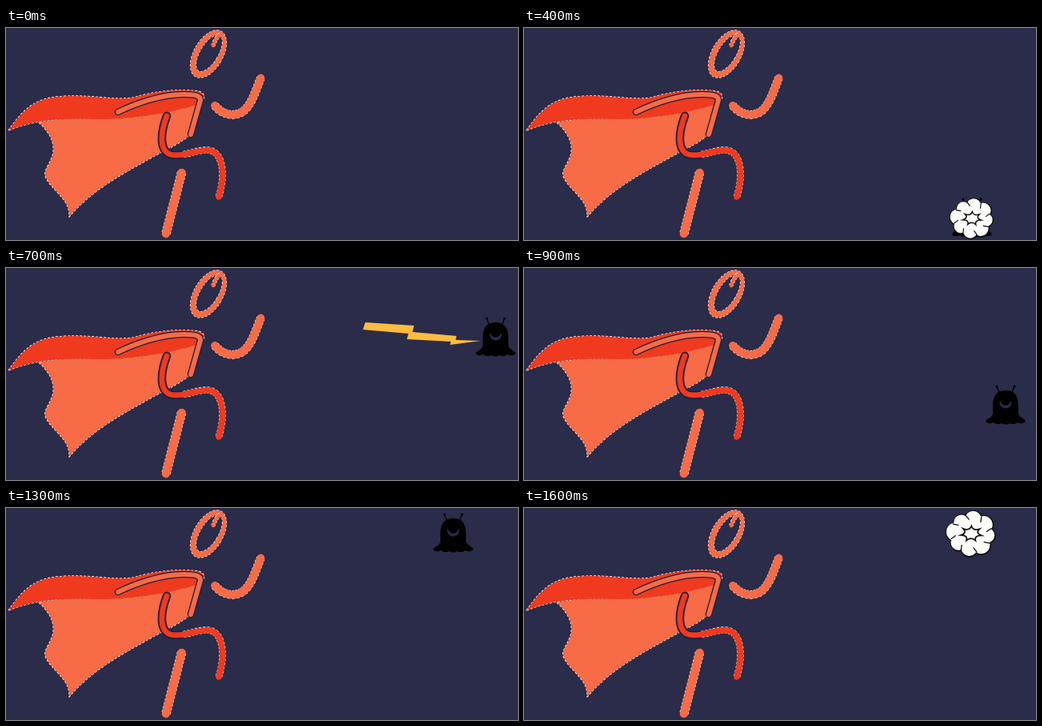
Write an HTML page with a canvas that moves like this. It is 640 px wide and 265 px high and loops after 1700 ms.

```html
<!DOCTYPE html>
<html lang="en">
<head>
<meta charset="utf-8">
<title>Caped hero</title>
<style>
html, body { margin: 0; width: 100%; height: 100%; overflow: hidden; background: #2b2c49; }
canvas { display: block; }
</style>
</head>
<body>
<canvas id="stage" width="640" height="265"></canvas>
<script>
const ctx = document.getElementById('stage').getContext('2d');
const NAVY = '#2b2c49', INK = '#1d1f42', ORANGE = '#f76b46', RED = '#ef3a1f';
const BOLT = '#ffbc40', CLOUD = '#fdfdf9', OUTLINE = '#0b0b10';
const STEP = 100, LOOP = 1700;
const HAND = { x: 326, y: 58 };
const BOLT_LENGTH = 147;

// Each visitor: top-left corner, bolt tip, cloud size
const visitors = [
  { x: 535, y: 212, tip: [540, 235], puff: 0.88, stays: true },
  { x: 587, y: 61, tip: [593, 91], puff: 1 },
  { x: 577, y: 146, tip: [581, 170], puff: 1 },
  { x: 534, y: 6, tip: [540, 38], puff: 1 }
];

const capeTop = new Path2D('M3 128C18 108 32 87 70 85.5C110 83 132 91 160 87C185 79 215 76 240 79Q251 82 246 91L238 96C200 108 150 115 110 114C70 113 40 113 3 128Z');
const capeBody = new Path2D('M41 118C58 133 62 148 58 160C53 174 45 180 51 189C60 205 81 215 79 236C108 201 150 180 180 163C205 149 222 142 231 132L239 95C200 108 150 115 110 114C80 113 60 114 41 118Z');
const torso = new Path2D('M140 105C165 93 198 82 225 83Q246 83 242.5 92L231 133');
const arm = new Path2D('M261 97C272 110 288 112 299 102C309 91 312 78 318.5 62.5');
const thigh = new Path2D('M201 110C194 128 191 150 203 157C209 160 216 159 222 158');
const shin = new Path2D('M222 158C234 156 244 151 255 153C272 157 274 185 266 211');
const straightLeg = new Path2D('M219.5 181L200 257');
const head = new Path2D();
head.ellipse(253, 32.5, 18, 32.5, 0.52, 0, 7);
head.closePath();
const face = new Path2D();
face.ellipse(254, 31.5, 11.5, 26, 0.54, 0, 7);
face.closePath();
head.addPath(face);
const curl = new Path2D('M268 8Q262 12 259 22');

const alien = new Path2D('M9 28C9 12 15 7 25 7C35 7 41 12 41 28L41 36C43 42 50 42 50 46Q46 50 40 47Q35 51 30 48Q25 51 20 48Q14 51 10 47Q3 50 0 46C1 42 8 42 9 36Z');
const antennae = new Path2D('M14 2L17 10M36 2L33 10');
const bolt = new Path2D('M1.4 -5.2L62.4 -8.7L61.4 -.5L116.6 -2.2L116.2 2.9L147 0L110 9.7L110.5 5.6L55.5 9.3L56.7 2.1L-.5 4.1Z');

function stroke(path, color, width, dash = [], cap = 'round') {
  ctx.strokeStyle = color;
  ctx.lineWidth = width;
  ctx.lineCap = cap;
  ctx.lineJoin = 'round';
  ctx.setLineDash(dash);
  ctx.stroke(path);
  ctx.setLineDash([]);
}

// Dashes under a shape leave a broken white rim
function rim(path, width) {
  stroke(path, '#fff', width, [3, 2], 'butt');
}

function fill(path, color, rule = 'nonzero') {
  ctx.fillStyle = color;
  ctx.fill(path, rule);
}

function disc(x, y, r, color) {
  ctx.fillStyle = color;
  ctx.beginPath();
  ctx.arc(x, y, r, 0, 7);
  ctx.fill();
}

function limb(path, color, width) {
  rim(path, width + 1);
  stroke(path, color, width);
}

function drawHero() {
  rim(capeBody, 1.5);
  rim(capeTop, 1.5);
  fill(capeBody, ORANGE);
  fill(capeTop, RED);
  stroke(torso, INK, 8.5);
  stroke(torso, ORANGE, 6);

  stroke(thigh, INK, 10.5);
  limb(shin, RED, 7.5);
  stroke(thigh, RED, 6.8);
  limb(straightLeg, ORANGE, 10.5);
  limb(arm, ORANGE, 9.8);

  rim(head, 1.2);
  fill(head, ORANGE, 'evenodd');
  limb(curl, ORANGE, 4.5);
}

function drawAlien({ x, y }) {
  ctx.save();
  ctx.translate(x, y);
  fill(alien, '#000');
  stroke(antennae, '#000', 1.2);
  disc(14, 2, 1.6, '#000');
  disc(36, 2, 1.6, '#000');
  ctx.fillStyle = NAVY;
  ctx.beginPath();
  ctx.arc(25, 22, 7.5, -0.2, Math.PI + 0.2);
  ctx.fill();
  disc(25, 19.4, 6.4, '#000');
  ctx.restore();
}

function drawBolt({ tip: [x, y] }, arrived) {
  ctx.save();
  ctx.translate(...(arrived ? [x, y] : [HAND.x, HAND.y]));
  ctx.rotate(Math.atan2(y - HAND.y, x - HAND.x));
  if (arrived) ctx.translate(-BOLT_LENGTH, 0);
  fill(bolt, BOLT);
  ctx.restore();
}

function drawPuff({ x, y, puff }) {
  const count = 8, turn = Math.PI * 2 / count;
  const point = (a, rx, ry) => [Math.cos(a) * rx, Math.sin(a) * ry];
  const lobes = Array.from({ length: count }, (_, i) => {
    const [lx, ly] = point(i * turn - 1.45, 20, 18);
    return { x: lx, y: ly, r: 10.3 + Math.sin(i * 2.4) };
  });
  ctx.save();
  ctx.translate(x + 25, y + 26);
  ctx.scale(puff, puff);
  for (const l of lobes) disc(l.x + 0.4, l.y + 0.4, l.r + 1.3, OUTLINE);
  for (const l of lobes) disc(l.x, l.y, l.r, CLOUD);
  disc(0, 0, 18, CLOUD);

  // Creases between the lobes
  ctx.strokeStyle = OUTLINE;
  ctx.lineCap = 'round';
  ctx.lineWidth = 1.3;
  ctx.beginPath();
  for (let i = 0; i < count; i++) {
    const a = (i + 0.5) * turn - 1.45;
    ctx.moveTo(...point(a, 26, 24));
    ctx.lineTo(...point(a + 0.12, 20, 18));
  }
  ctx.stroke();

  // Scalloped opening with sharp cusps
  const cusps = 7, arc = Math.PI * 2 / cusps;
  ctx.lineWidth = 1.7;
  ctx.lineJoin = 'miter';
  ctx.beginPath();
  ctx.moveTo(...point(0.25, 13, 9.5));
  for (let i = 1; i <= cusps; i++) {
    const a = 0.25 + i * arc;
    ctx.quadraticCurveTo(...point(a - arc / 2, 5, 3.5), ...point(a, 13, 9.5));
  }
  ctx.closePath();
  ctx.stroke();
  ctx.restore();
}

function draw(now) {
  const tick = Math.floor((now % LOOP) / STEP);
  ctx.fillStyle = NAVY;
  ctx.fillRect(0, 0, 640, 265);
  drawHero();

  // One empty beat, then appear, shoot, hit and burst for each visitor
  if (tick > 0) {
    const visitor = visitors[Math.floor((tick - 1) / 4)];
    const phase = (tick - 1) % 4;
    if (phase < 3 || visitor.stays) drawAlien(visitor);
    if (phase === 1 || phase === 2) drawBolt(visitor, phase === 2);
    if (phase === 3) drawPuff(visitor);
  }
}

const start = performance.now();
function frame() {
  draw(performance.now() - start);
  requestAnimationFrame(frame);
}
frame();
</script>
</body>
</html>
```
